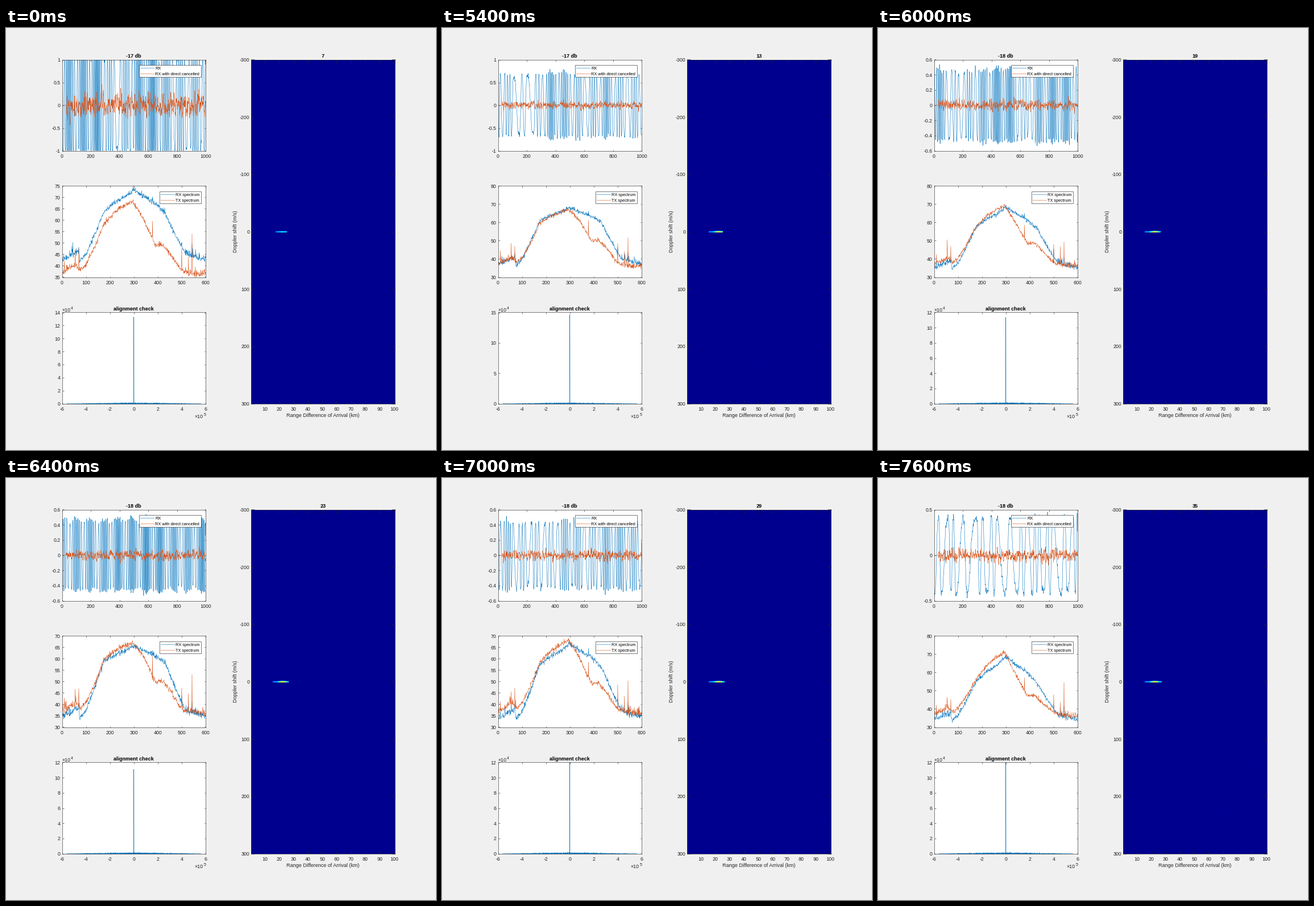
A matplotlib script for the animation above (7800 ms loop, 756x741 px).

```python
import numpy as np
import matplotlib.pyplot as plt
from matplotlib.animation import FuncAnimation
from matplotlib.colors import LinearSegmentedColormap
from matplotlib.patches import Rectangle

W, H = 756, 741
STEP = 200            # ms per frame
HOLD = 25             # frames spent on the first scan
SCANS = 15
BLUE, ORANGE, INK = "#0072BD", "#D95319", "#262626"
TICK, LABEL, LEGEND = 8.8, 8.95, 7.4
THIN, FRAME = .55, .6

plt.rcParams["font.family"] = "Liberation Sans"

# Readings that jump: {first scan: value}
DB = {0: -17, 1: -16, 3: -17, 5: -18}
WAVE_LIM = {0: 1, 4: .8, 5: .5, 6: .6, 9: .5, 10: .6, 12: .8, 13: .5}
SPEC_LIM = {0: (35, 75), 1: (30, 80), 7: (30, 70), 13: (30, 80)}
PEAK_LIM = {0: 14, 1: 25, 2: 18, 3: 15, 4: 14, 6: 12}

# Readings that drift: {scan: value}
PEAK = {0: 13.3, 1: 20.1, 3: 14.6, 6: 11.35, 8: 11.1, 11: 12}
BEAT = {0: 7, 1: 3, 3: 6, 8: 8, 14: 2.2}              # cycles per 100 samples
POINTED = {0: .4, 1: 0, 3: .1, 6: .6, 8: .1, 11: .4, 14: 1}

SPURS = {10: 5, 55: 7, 70: 8, 378: 8, 500: 10, 528: 8, 543: 17}

JET = LinearSegmentedColormap.from_list("deep_jet", [
    (0, "#00008f"), (.11, "#0000ff"), (.365, "#00ffff"),
    (.62, "#ffff00"), (.873, "#ff0000"), (1, "#800000")])

T = np.arange(1000)
BINS = np.arange(601)
LAGS = np.linspace(-5.6e5, 5.6e5, 2401)


def held(steps, k):
    return steps[max(s for s in steps if s <= k)]


def drift(points, k):
    return np.interp(k, list(points), list(points.values()))


def smooth_noise(rng, size):
    return np.convolve(rng.normal(size=size), np.ones(3) / 3, "same")


def waveforms(k, rng):
    rate = drift(BEAT, k) * np.interp(T, np.linspace(0, 1000, 9), rng.uniform(.3, 1.6, 9))
    rate *= 1 + .5 * np.sin(2 * np.pi * (T / 97 + rng.random()))
    wave = np.cos(2 * np.pi * (np.cumsum(rate) / 100 + rng.random()))
    wave = np.tanh(1.3 * wave) / np.tanh(1.3)
    amp = .43 + .6 * np.exp(-(k / 3.2) ** 2)
    rx = amp * ((.95 + .013 * rate) * wave + .09 * smooth_noise(rng, 1000))
    residue = (.06 + .15 * np.exp(-k / 1.2)) * smooth_noise(rng, 1000)
    residue[:30] = 0
    return np.clip(rx, -1, 1), residue


def textured(level, spur_gain, rng):
    """Add the ragged noise and narrow interference lines."""
    edge = (BINS < 75) | (BINS > 515)
    level = level + .6 * rng.normal(size=601) + edge * rng.exponential(.8, 601)
    for x, height in SPURS.items():
        level[x] += spur_gain * height * rng.uniform(.85, 1.05)
    return level


def spectra(k, rng):
    point = drift(POINTED, k)
    near, far = 60 - 4 * point, 66.7 + 4.3 * point     # TX shoulder and crest

    def between(a, b, *parts):
        return [a + (b - a) * p for p in parts]

    tx = np.interp(
        BINS, [0, 60, 75, 100, 140, 175, 220, 260, 295, 340, 390, 420, 450, 495, 530, 600],
        [36.5, 40, 38, 40.5, *between(40.5, near, .48, 1), *between(near, far, .52, .8, 1, .22),
         .84 * near, .845 * near, .78 * near, 38.5, 36, 35.5])

    floor = 33.5 + 8.5 * np.exp(-k / 3)
    near += 6.5 * np.exp(-k / 3) - 1
    far += 7.5 * np.exp(-k / 4) - 2.5
    rx = np.interp(
        BINS, [0, 60, 71, 74, 100, 140, 175, 220, 260, 300, 340, 380, 430, 470, 520, 600],
        [floor, floor + 3, floor + 3.5, floor, floor + 3, *between(floor, near, .57, 1),
         *between(near, far, .4, .65, 1, .7, .45), near - .7, *between(floor, near, .56),
         floor + 2.5, floor])
    return textured(rx, .3, rng), textured(tx, 1, rng)


def correlation(k, rng):
    y = 520 * np.abs(rng.normal(size=LAGS.size)) * (1 - np.abs(LAGS) / 5.7e5)
    y[LAGS.size // 2] = drift(PEAK, k) * 1e4
    return y


def heat_map(k, rng):
    grid = np.zeros((601, 100))
    cells = np.arange(round(16 + 2 * np.exp(-k)), round(25 + k / 9) + 1)
    strength = .1 + .3 * (1 - np.exp(-k))
    level = .25 + strength * np.exp(-((cells - 22.5) / 2.8) ** 2)
    grid[300, cells - 1] = level
    grid[299, cells - 1] = .5 * level
    # One or two faint stray returns
    for _ in range(rng.integers(1, 3)):
        row, cell = rng.integers(20, 580), rng.integers(20, 98)
        grid[row, cell:cell + 2] = rng.uniform(.03, .06)
    return grid


fig = plt.figure(figsize=(W / 72, H / 72), dpi=72, facecolor="#f0f0f0")


def panel(left, top, right, bottom, tick):
    ax = fig.add_axes([left / W, 1 - bottom / H, (right - left) / W, (bottom - top) / H])
    ax.tick_params(direction="in", top=True, right=True, length=tick, width=FRAME,
                   color=INK, labelcolor=INK, labelsize=TICK)
    ax.tick_params(axis="x", pad=5.5)
    ax.tick_params(axis="y", pad=3)
    for spine in ax.spines.values():
        spine.set(linewidth=FRAME, color=INK)
    return ax


def set_ticks(axis, values, scale=1):
    axis.set_ticks(values, [f"{round(v / scale, 3) + 0:g}" for v in values])


def trace(ax, x, color):
    return ax.plot(x, np.zeros(len(x)), color=color, lw=THIN)[0]


wave_ax = panel(98.5, 55.5, 351, 215.5, 2.5)
spec_ax = panel(98.5, 277.5, 351, 437.5, 2.5)
peak_ax = panel(98.5, 499.5, 351, 659.5, 2.5)
heat_ax = panel(431.4, 55.5, 683.6, 659.5, 6)

rx_line, residue_line = trace(wave_ax, T, BLUE), trace(wave_ax, T, ORANGE)
rx_spec, tx_spec = trace(spec_ax, BINS, BLUE), trace(spec_ax, BINS, ORANGE)
peak_line = trace(peak_ax, LAGS, BLUE)
image = heat_ax.imshow(np.zeros((601, 100)), cmap=JET, vmin=0, vmax=1, aspect="auto",
                       interpolation="nearest", extent=[.5, 100.5, 300.5, -300.5])

wave_ax.set_xlim(0, 1000)
spec_ax.set_xlim(0, 600)
peak_ax.set_xlim(-6e5, 6e5)
heat_ax.set_ylim(300, -300)
set_ticks(wave_ax.xaxis, range(0, 1001, 200))
set_ticks(spec_ax.xaxis, range(0, 601, 100))
set_ticks(peak_ax.xaxis, np.arange(-6, 7, 2) * 1e5, 1e5)
set_ticks(heat_ax.xaxis, range(10, 101, 10))
set_ticks(heat_ax.yaxis, range(-300, 301, 100))

# Overlay in stage pixels for captions and legends
over = fig.add_axes([0, 0, 1, 1], zorder=5)
over.set(xlim=(0, W), ylim=(H, 0))
over.axis("off")


def caption(x, y, text, size=LABEL, color=INK, ha="center", **kw):
    return over.text(x, y, text, fontsize=size, color=color, ha=ha, **kw)


def exponent(x, y, power):
    caption(x, y, "×10", TICK, ha="left")
    return caption(x + 15.5, y - 4, power, 7, ha="left")


def legend(left, top, names):
    over.add_patch(Rectangle((left, top), 342.5 - left, 21, fc="white", ec=INK, lw=FRAME))
    for i, (name, color) in enumerate(zip(names, (BLUE, ORANGE))):
        y = top + 5.6 + 10 * i
        over.plot([left + 2, left + 26], [y, y], color=color, lw=THIN)
        caption(left + 28.5, y + 2.7, name, LEGEND, "black", ha="left")


title = dict(color="black", weight="bold")
db_text = caption(224.8, 51.6, "", **title)
count_text = caption(557.5, 51.6, "", **title)
caption(224.8, 495.6, "alignment check", **title)
caption(557.3, 683.3, "Range Difference of Arrival (km)")
caption(403.6, 357.5, "Doppler shift (m/s)", rotation=90, va="center")
power_text = exponent(98.5, 497.6, "4")
exponent(331.8, 685, "5")
legend(233.5, 64.5, ("RX", "RX with direct cancelled"))
legend(269.5, 286.5, ("RX spectrum", "TX spectrum"))


def rescale(k):
    lim = held(WAVE_LIM, k)
    step = .5 if lim in (.5, 1) else .2
    n = round(lim / step)
    set_ticks(wave_ax.yaxis, np.arange(-n, n + 1) * step)
    wave_ax.set_ylim(-lim, lim)

    low, high = held(SPEC_LIM, k)
    set_ticks(spec_ax.yaxis, range(low, high + 1, 10 if high == 80 else 5))
    spec_ax.set_ylim(low, high)

    top = held(PEAK_LIM, k)
    power = 5 if top > 20 else 4
    step = 5 if top % 5 == 0 else 2
    set_ticks(peak_ax.yaxis, np.arange(0, top + 1, step) * 1e4, 10 ** power)
    peak_ax.set_ylim(0, top * 1e4)
    power_text.set_text(str(power))


def update(frame):
    k = max(0, frame - HOLD + 1)
    rng = np.random.default_rng(40 + k)
    for line, y in zip((rx_line, residue_line), waveforms(k, rng)):
        line.set_ydata(y)
    for line, y in zip((rx_spec, tx_spec), spectra(k, rng)):
        line.set_ydata(y)
    peak_line.set_ydata(correlation(k, rng))
    image.set_data(heat_map(k, rng))
    rescale(k)
    db_text.set_text(f"{held(DB, k)} db")
    count_text.set_text(str(7 + 2 * k))
    return []


anim = FuncAnimation(fig, update, frames=HOLD + SCANS - 1, interval=STEP, repeat=True)
plt.show()
```
